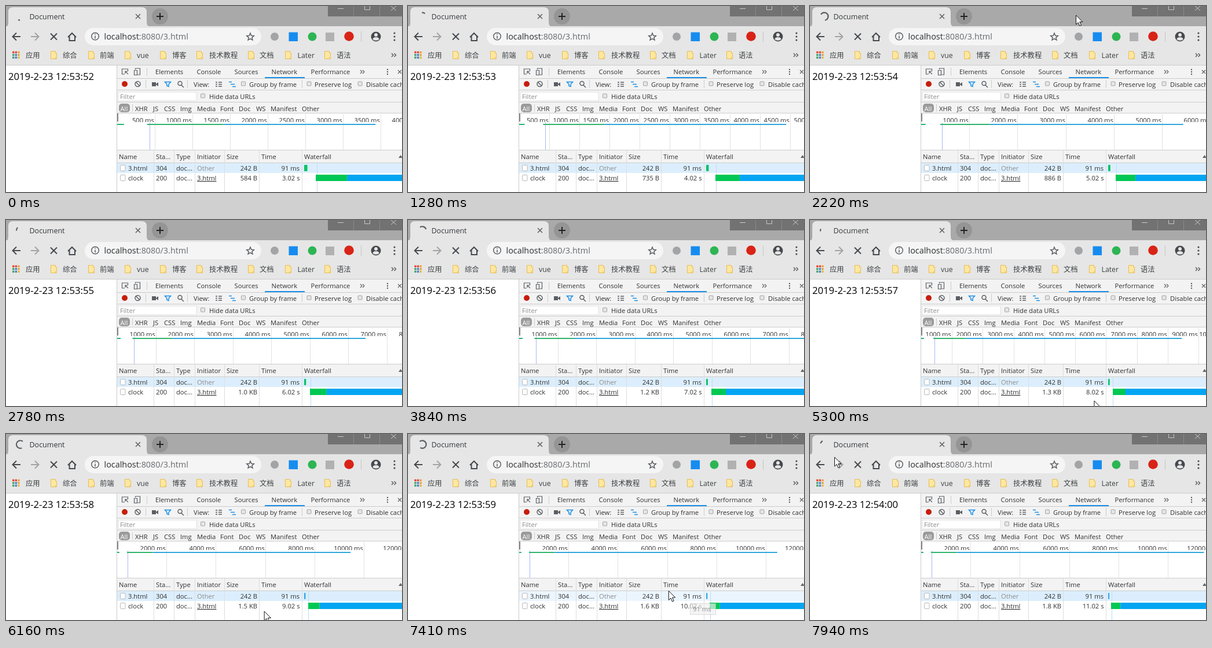
An HTML page that plays this animation: 684 px wide and 322 px high, repeating every 8 s.

```html
<!DOCTYPE html>
<html lang="zh">
<head>
<meta charset="utf-8">
<title>Network panel</title>
<style>
  html, body { margin: 0; width: 100%; height: 100%; overflow: hidden; background: #fff; }
  svg { display: block; width: 684px; height: 322px; }
  text { font: 11.2px "Open Sans", "Noto Sans CJK SC", "Noto Sans CJK", sans-serif; fill: #303030; white-space: pre; }
  .title { font-size: 12.5px; fill: #33363a; }
  .url { font-size: 14.4px; fill: #2c2e31; }
  .url tspan { fill: #66696d; }
  .mark { font-size: 12.3px; fill: #3c4043; }
  .clock { font-size: 16.7px; fill: #000; }
  .dim { fill: #8c8c8c; }
  .end { text-anchor: end; }
  .link { text-decoration: underline; }
  .line { fill: none; stroke: #5a5e63; stroke-width: 1.5; }
  .nav { fill: none; stroke: #45494d; stroke-width: 2; }
  .rule { fill: none; stroke: #ccc; }
  .grid { fill: none; stroke: #e2e2e2; }
  .blue { stroke: #1a8fe6; }
</style>
</head>
<body>
<svg viewBox="0 0 684 322">
  <defs>
    <clipPath id="overview"><rect x="192" y="186" width="492" height="63"/></clipPath>
    <clipPath id="ruler"><rect x="192" y="186" width="492" height="15"/></clipPath>
    <path id="folder" d="M.5.5h8v3h2v10H.5zM8.500 10.500v3" fill="#ffe79f" stroke="#e6bd55"/>
    <rect id="check" width="7" height="7" rx="1" fill="#e6e6e6" stroke="#a3a3a3"/>
    <rect id="file" x=".5" y=".5" width="8.500" height="10" rx="1" fill="#fff" stroke="#b8b8b8"/>
  </defs>

  <!-- window and tab strip -->
  <rect width="684" height="36" fill="#a9a9a9"/>
  <path d="M0 36q4 0 4-8V10q0-8 8-8h222q9 0 9 8v18q0 8 7 8z" fill="#e6e6e6"/>
  <path id="spin" class="line" style="stroke-width:2.200"/>
  <path class="line" d="M224 14l8 8m0-8l-8 8"/>
  <circle cx="266" cy="18" r="14" fill="#959595"/>
  <path class="nav" style="stroke:#222" d="M260 18h12m-6-6v12"/>
  <rect x="556" width="128" height="18" fill="#727272"/>
  <path d="M573 4.500h10M619.500 0v6.500h9V0M665 0l9 8m0-8l-9 8" fill="none" stroke="#c9c9c9"/>
  <path d="M600.500 0v18M645.500 0v18" stroke="#8a8a8a"/>

  <!-- toolbar -->
  <rect y="35" width="684" height="68" fill="#e6e6e6"/>
  <rect x="136" y="38" width="305" height="30" rx="15" fill="#f5f5f5"/>
  <path class="nav" d="M25 53H12m6-6.500L11.500 53l6.500 6.500M77 47.500l11 11m0-11l-11 11M107 54l7-7 7 7M109.500 52v8h9.500v-8"/>
  <path class="nav" style="stroke:#a2a3a5" d="M43 53h13m-6-6.500l6.500 6.500-6.500 6.500"/>
  <circle class="line" cx="154" cy="52.500" r="6.300"/>
  <path class="line" d="M154 51.500v5m0-8.500v1.500"/>
  <path class="line" d="M422 47l1.800 4.200 4.500.4-3.400 3 1 4.400-3.900-2.400-3.900 2.400 1-4.400-3.400-3 4.500-.4z"/>
  <circle cx="464" cy="53" r="7" fill="#a2a4a6"/>
  <rect x="488.500" y="45.500" width="15.500" height="15.500" fill="#168cf0"/>
  <circle cx="529" cy="53" r="7.500" fill="#2db553"/>
  <rect x="552" y="46" width="15" height="15" fill="#b1b1b1"/>
  <circle cx="592.500" cy="52.500" r="8.300" fill="#d92316"/>
  <path d="M613.500 44v18" stroke="#c5c5c5"/>
  <circle cx="639" cy="53" r="8.500" fill="#46494d"/>
  <circle cx="639" cy="50" r="3" fill="#e6e6e6"/>
  <path d="M633.500 58q0-4 5.500-4t5.500 4q-5.500 3.500-11 0" fill="#e6e6e6"/>
  <g fill="#45494d"><circle cx="671" cy="47" r="1.600"/><circle cx="671" cy="53" r="1.600"/><circle cx="671" cy="59" r="1.600"/></g>
  <path class="line" d="M666 82l3 3-3 3m4.500-6l3 3-3 3"/>
  <g id="apps"></g>

  <!-- developer panel -->
  <rect x="191" y="103" width="493" height="83" fill="#f3f3f3"/>
  <rect x="192" y="250" width="492" height="22" fill="#f3f3f3"/>
  <path class="rule" d="M0 102.500h684M191.500 103v219M192 125.500h492M192 145.500h492M192 166.500h492M192 185.500h492M192 249.500h492M192 271.500h492M243.500 107v14M241.500 128v14M313.500 128v14M511.500 128v14M218.500 170v13"/>
  <rect x="447" y="123" width="69" height="2" fill="#1a8fe6"/>
  <path class="line" style="stroke-width:1.200" d="M205 118h-4.500v-9h10v4M206 113l5 5m-5-1v-4h4M223.500 110v-2h8v11h-4M221.500 111.500h5v8h-5zM612 111l3 3-3 3m4-6l3 3-3 3M677 111l6 6m0-6l-6 6"/>
  <g fill="#5a5e63"><circle cx="659" cy="110" r="1.200"/><circle cx="659" cy="114" r="1.200"/><circle cx="659" cy="118" r="1.200"/></g>
  <circle cx="205" cy="135" r="5" fill="#c71d0c"/>
  <path class="line" d="M232 135a4.500 4.500 0 1 0-9 0a4.500 4.500 0 1 0 9 0M224.500 132l6.500 6.500M303 137l4 4M304 134a3.500 3.500 0 1 0-7 0a3.500 3.500 0 1 0 7 0"/>
  <path d="M252 132h7v7h-7zM259 135l4-3v7l-4-3z" fill="#5a5e63"/>
  <path class="line blue" d="M274.500 131.500h10l-3.500 4v4l-3-1v-3z"/>
  <path class="line" d="M362 132h3m2 0h6M362 135.500h3m2 0h6M362 139h3m2 0h6"/>
  <path class="line blue" d="M385 131.500h5m-2 4h7m-4 4h6"/>
  <rect x="194" y="149" width="135" height="15" fill="#fff" stroke="#e1e1e1"/>
  <rect x="195" y="169" width="19" height="15" rx="5" fill="#9b9b9b"/>

  <!-- timeline -->
  <g clip-path="url(#overview)">
    <g id="ticks"></g>
    <path id="loadLine" stroke="#a9b6f5"/>
    <rect id="pageBar" x="192" y="204" height="2" fill="#22b573"/>
    <rect id="waitBar" y="204" height="2" fill="#2cb56b"/>
    <rect id="dataBar" y="204" height="2" fill="#2ea6dc"/>
  </g>
  <g id="times" clip-path="url(#ruler)"></g>
  <rect x="192" y="186" width="2" height="14" fill="#858585"/>

  <!-- requests -->
  <rect id="row" x="192" y="272" width="492" height="17"/>
  <path class="rule" style="stroke:#ddd" d="M255.500 250v72M290.500 250v72M326.500 250v72M377.500 250v72M437.500 250v72M511.500 250v72"/>
  <path d="M678 263l3.500-5 3.500 5z" fill="#666"/>
  <path id="rowLine" stroke="#bcdcf4"/>
  <rect id="pageCell" x="515" y="275" height="11" rx="1"/>
  <rect id="waitCell" y="292" height="11" fill="#00c853"/>
  <rect id="dataCell" y="292" height="11" fill="#03a5f2"/>
  <g id="labels"></g>

  <g id="tip">
    <rect x="487.500" y="293.500" width="44" height="19" fill="#f0f0f0" stroke="#ccc"/>
    <text x="492" y="307" style="fill:#555">91 ms</text>
  </g>
  <path id="mouse" d="M.5 0v16l3.700-3.500 2.600 6 2.600-1.200-2.600-5.800h5z" fill="#fff" stroke="#111"/>
</svg>
<script>
const $ = id => document.getElementById(id);
const text = (x, y, s, cls = '', id = '') => `<text x="${x}" y="${y}" class="${cls}" id="${id}">${s}</text>`;
const use = (id, x, y) => `<use href="#${id}" x="${x}" y="${y}"/>`;
const row = (y, items, cls) => items.map(([x, s]) => text(x, y, s, cls)).join('');
const set = (id, attrs) => { for (const k in attrs) $(id).setAttribute(k, attrs[k]); };

const dots = ['#e2493b', '#e2493b', '#e8a33a', '#45a564', '#4283d8', '#e8a33a', '#45a564', '#4283d8', '#e8b93a'];
$('apps').innerHTML = dots.map((c, i) =>
  `<rect x="${11 + i % 3 * 4.6}" y="${78.5 + (i / 3 | 0) * 4.6}" width="3.400" height="3.400" fill="${c}"/>`).join('');

$('labels').innerHTML =
  text(40.5, 23, 'Document', 'title') + text(169.5, 58, 'localhost<tspan>:8080/3.html</tspan>', 'url') +
  row(90, [[34, '应用'], [98, '综合'], [162, '前端'], [226, 'vue'], [287, '博客'], [351, '技术教程'],
    [438, '文档'], [503.5, 'Later'], [571, '语法']], 'mark') +
  [76, 141, 204, 265, 328, 417, 481, 549].map(x => use('folder', x + 1, 78)).join('') +
  text(4, 128, '', 'clock', 'clock') +
  row(118, [[258, 'Elements'], [329.5, 'Console'], [394.5, 'Sources'], [458.5, 'Network'], [526.5, 'Performance']]) +
  row(139.5, [[324, 'View:'], [420, 'Group by frame'], [533, 'Preserve log'], [622, 'Disable cache']]) +
  [[406.5, 131], [520, 131], [608, 131], [336.5, 152]].map(p => use('check', ...p)).join('') +
  text(197, 161, 'Filter', 'dim') + text(351, 160.5, 'Hide data URLs') +
  `<text x="197.500" y="181.500" style="fill:#fff">All</text>` +
  row(181.5, [[223, 'XHR'], [254, 'JS'], [273, 'CSS'], [301, 'Img'], [330, 'Media'], [370, 'Font'],
    [402, 'Doc'], [432, 'WS'], [457, 'Manifest'], [511, 'Other']]) +
  row(264.5, [[195, 'Name'], [259, 'Sta...'], [294, 'Type'], [330, 'Initiator'], [381, 'Size'], [441, 'Time'], [515, 'Waterfall']]) +
  row(285, [[211, '3.html'], [259, '304'], [294, 'doc...']]) + text(330, 285, 'Other', 'dim') +
  row(285, [[434, '242 B'], [507, '91 ms']], 'end') +
  row(302, [[211, 'clock'], [259, '200'], [294, 'doc...']]) + text(330, 302, '3.html', 'link') +
  text(434, 302, '', 'end', 'size') + text(507.5, 302, '', 'end', 'time') +
  use('file', 197, 275) + use('file', 197, 292);

const LEFT = 192, START = 0.397, LOADED = 0.43, WAIT = 1, PAGE = 0.091;
let shown = -1;

// The overview zooms out by 1.25 whenever the requests outgrow it.
function drawSecond(n) {
  const took = 3.02 + n, total = START + took;
  let scale = 130;
  while (scale * total > 497) scale /= 1.25;

  $('clock').textContent = '2019-2-23 12:' + (n < 8 ? '53:' + (52 + n) : '54:00');
  const bytes = 584 + 151 * n;
  $('size').textContent = bytes < 1000 ? bytes + ' B' : (bytes / 1024).toFixed(1) + ' KB';
  $('time').textContent = took.toFixed(2) + ' s';

  const step = [0.5, 1, 2].find(s => s * scale >= 50);
  let ticks = '', times = '';
  for (let s = step; s * scale < 580; s += step) {
    const x = Math.round(LEFT + s * scale);
    ticks += `<path class="grid" d="M${x + 0.5} 187V249"/>`;
    times += text(x - 1.2, 201.5, s * 1000 + ' ms', 'end');
  }
  $('ticks').innerHTML = ticks;
  $('times').innerHTML = times;

  const x = LEFT + START * scale, load = Math.round(LEFT + LOADED * scale) + 0.5;
  set('pageBar', { width: PAGE * scale });
  set('waitBar', { x, width: WAIT * scale + 2 });
  set('dataBar', { x: x + WAIT * scale + 2, width: (took - WAIT) * scale });
  set('loadLine', { d: `M${load} 202V249` });

  const k = 185 / total, cell = Math.round(514 + START * k), line = Math.round(514 + LOADED * k) + 0.5;
  set('pageCell', { width: Math.max(1.2, PAGE * k + 0.7), fill: n < 6 ? '#0cc267' : '#35a9e6' });
  set('waitCell', { x: cell, width: WAIT * k });
  set('dataCell', { x: cell + WAIT * k, width: (took - WAIT) * k });
  set('rowLine', { d: `M${line} 273V322` });
}

function drawSpinner(t) {
  const sweep = Math.max(25, 255 * Math.abs(Math.sin(Math.PI * (t - 30) / 1332)));
  const mid = 108 + 0.422 * t;
  const at = deg => {
    const a = deg * Math.PI / 180;
    return `${24.7 + 6.7 * Math.cos(a)} ${18 + 6.7 * Math.sin(a)}`;
  };
  set('spin', { d: `M${at(mid - sweep / 2)}A6.7 6.7 0 ${+(sweep > 180)} 1 ${at(mid + sweep / 2)}` });
}

// time, x, y
const paths = [
  [[2060, 446, -20], [2220, 459, 16], [2320, 462, 12], [2440, 468, -20]],
  [[5150, 520, 322], [5300, 490.5, 313], [5700, 462, 309], [6160, 445.5, 307], [6480, 487, 272],
    [7270, 487, 272], [7410, 450.5, 272], [7870, 108, 71], [7940, 42, 40], [8000, 42, 40]]
];

function drawMouse(t) {
  const path = paths.find(p => t >= p[0][0] && t < p[p.length - 1][0]);
  set('mouse', { visibility: path ? 'visible' : 'hidden' });
  if (!path) return;
  const i = path.findIndex(p => p[0] > t), [t0, x0, y0] = path[i - 1], [t1, x1, y1] = path[i];
  const f = (t - t0) / (t1 - t0);
  set('mouse', { transform: `translate(${x0 + (x1 - x0) * f} ${y0 + (y1 - y0) * f})` });
}

function draw() {
  const t = performance.now() % 8000;
  const n = Math.floor((t + 500) / 1000);
  if (n !== shown) drawSecond(shown = n);
  drawSpinner(t);
  drawMouse(t);
  set('row', { fill: t > 6450 && t < 7480 ? '#ebf5fe' : '#dceefd' });
  const fade = Math.min((t - 7000) / 100, (7600 - t) / 280);
  set('tip', { opacity: Math.max(0, Math.min(0.95, fade)) });
  requestAnimationFrame(draw);
}
draw();
</script>
</body>
</html>
```
